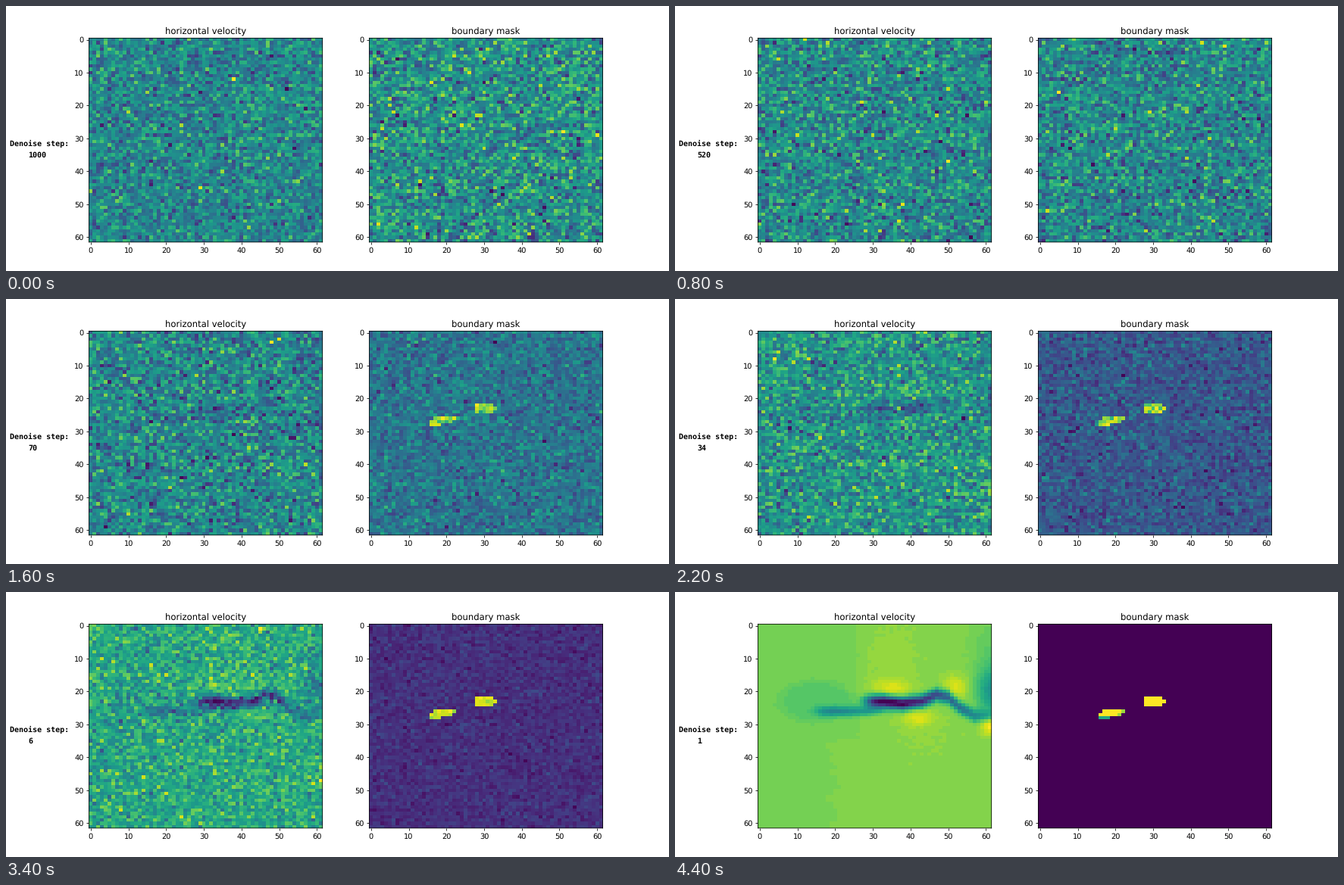
Animation of 875x350 px, one loop 4600 ms. Source, as a matplotlib script:

```python
import numpy as np
import matplotlib.pyplot as plt
from matplotlib.animation import FuncAnimation

W, H, DPI = 875, 350, 70
N = 62
STEPS = [*range(1000, 100, -120), *range(70, 10, -12), *range(10, 0, -1)]
COUNT = len(STEPS)
rng = np.random.default_rng(7)
Y, X = np.mgrid[0:N, 0:N].astype(float)

plt.rcParams.update({"path.snap": False, "text.hinting": "none"})


def blob(cx, cy, sx, sy):
    return np.exp(-((X - cx) / sx) ** 2 / 2 - ((Y - cy) / sy) ** 2 / 2)


def step(v, edge, width):
    return 1 / (1 + np.exp(-(v - edge) / width))


def band(centre, width):
    return np.exp(-((Y - centre) / width) ** 2)


def flow_field():
    """Clean velocity: two wakes behind the bodies, the second one shedding."""
    jag = np.repeat(rng.normal(0, 1.2, N // 2), 2)[:, None]
    f = .772 + .028 * step(X, np.where(Y > 34, 20 + jag, 26), .8)
    f += .022 * blob(35, 9, 6, 9) + .015 * blob(44, 34, 7, 6)
    f -= .05 * step(blob(15, 23, 8, 5), .5, .07)

    # faster flow beside the wake, slower flow at the outlet
    f += .12 * blob(35, 19, 3.5, 2) + .12 * blob(42, 28, 2.8, 1.8)
    f += .12 * blob(52, 18.5, 2.3, 2.5) + .22 * blob(61.5, 30, 2, 2.2)
    f -= .28 * blob(62, 20, 3, 4.5) + .07 * blob(62, 9, 4, 8)

    short = .27 * step(X, 15.5, .8) * step(-X, -33, 2)
    f -= short * band(26 - step(X, 32, 2), 1.4)
    centre = np.interp(X, [33, 38, 43, 47, 50, 53, 57],
                       [23, 23.7, 23, 21, 21.8, 24.8, 27.4])
    long = (.8 - .025 * np.clip(X - 38, 0, None)) * step(X, 28.5, 1)
    f -= long * band(centre, 1.8)
    f += rng.normal(0, .003, (N, N))
    return np.round(f * 40) / 40


def mask_field():
    """Two bodies, and the soft edge of the lower one."""
    m, soft = np.zeros((2, N, N))
    m[22:25, 28:33] = m[23, 33] = 1
    for row, left, right in ((26, 17, 23), (27, 16, 22), (28, 16, 19)):
        m[row, left:right] = 1
        soft[row, right - 1] = .15
    soft[28, 16:19] = .4
    return m, soft


def noise_run():
    """Noise that is fresh after long jumps and drifts over short ones."""
    eps = rng.normal(size=(N, N))
    run = [eps]
    for jump in -np.diff(STEPS):
        keep = np.exp(-jump / 15)
        eps = keep * eps + np.sqrt(1 - keep ** 2) * rng.normal(size=(N, N))
        run.append(eps)
    return run


def noisy(clean, eps, t):
    return np.cos(np.pi * t / 2000) * clean + .019 * (t - 1) ** .58 * eps


FLOW = flow_field()
MASK, SOFT = mask_field()
FLOW_EPS, MASK_EPS = noise_run(), noise_run()

# Each panel is a shade taller than its pixel rows, so the box sits off-grid
fig, axes = plt.subplots(1, 2, figsize=(W / DPI, H / DPI), dpi=DPI)
fig.subplots_adjust(left=109.475 / W, right=787.6 / W,
                    top=1 - 42.35 / H, bottom=1 - 311.85 / H)
images = []
for ax, title in zip(axes, ("horizontal velocity", "boundary mask")):
    ax.set_title(title)
    images.append(ax.imshow(np.zeros((N, N)), cmap="viridis", aspect="auto",
                            interpolation="nearest"))
    ax.set_xticks(range(0, N, 10))
    ax.set_yticks(range(0, N, 10))


def label(x, y, text):
    return fig.text(x / W, 1 - y / H, text, family="DejaVu Sans Mono",
                    weight="bold", size=10 * 72 / DPI, va="baseline")


label(5, 185, "Denoise step:")
counter = label(29, 200, "")


def draw(i):
    t = STEPS[i]
    panels = (noisy(FLOW * .3, FLOW_EPS[i], t),
              noisy(MASK - SOFT / t, MASK_EPS[i], t))
    for image, data in zip(images, panels):
        image.set_data(data)
        image.autoscale()
    counter.set_text(str(t))
    return [*images, counter]


anim = FuncAnimation(fig, draw, frames=COUNT, interval=200, repeat=True,
                     repeat_delay=0, init_func=lambda: draw(0))
plt.show()
```
